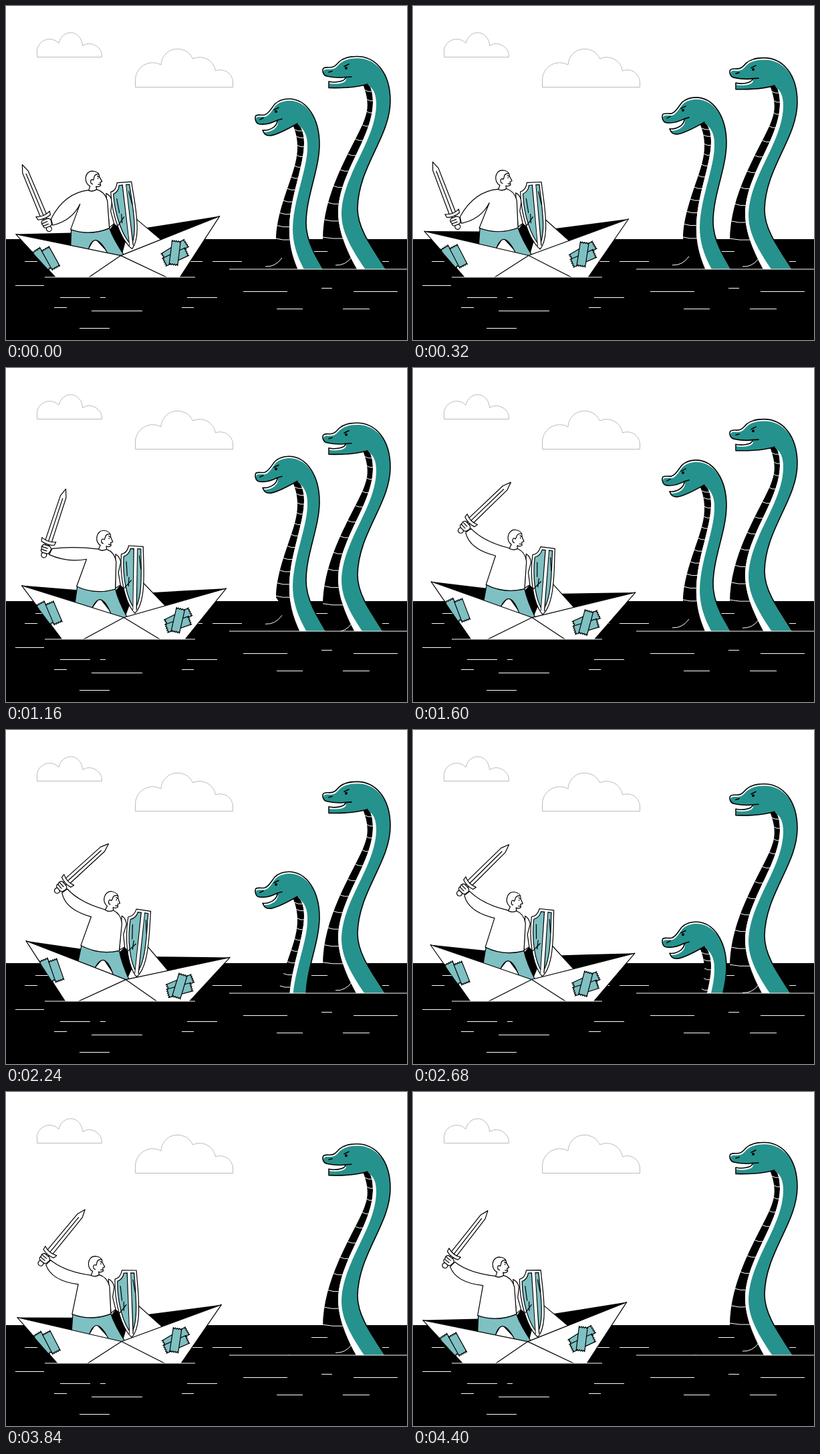
An HTML page that plays this animation: 600x500 px, repeating every 4440 ms.

```html
<!DOCTYPE html>
<html lang="en">
<head>
<meta charset="utf-8">
<title>Paper boat and sea serpents</title>
<style>
html, body { margin: 0; width: 100%; height: 100%; overflow: hidden; background: #fff; }
svg { display: block; width: 600px; height: 500px; }
.ink { fill: none; stroke: #000; stroke-width: 1.2; stroke-linejoin: round; stroke-linecap: round; }
.paper { fill: #fff; }
.aqua { fill: #7fc0c3; }
.foam { fill: none; stroke: #fff; }
.teal { fill: #26928d; }
.bold { stroke-width: 1.6; }
</style>
</head>
<body>
<svg viewBox="0 0 600 500">
  <defs>
    <clipPath id="aboveSerpentLine"><path d="M0 0H600V394H0Z"/></clipPath>
    <clipPath id="aboveBoatLine"><path d="M0 0H600V406H0Z"/></clipPath>
    <clipPath id="hullClip"><path d="M14 342L171 374L319 315L245 429H94Z"/></clipPath>
  </defs>

  <g fill="none" stroke="#b9bdbd">
    <path d="M46.5 76.5V72A19 19 0 0 1 79 55.5A18 20.500 0 0 1 114.5 59.5A19 19 0 0 1 143.5 76.5Z"/>
    <path d="M193.5 121.5V112A26 26 0 0 1 232 88A24.800 24.800 0 0 1 279.5 79A24 24 0 0 1 313.5 97A19 19 0 0 1 339.5 113V121.5Z"/>
  </g>

  <path d="M0 349H600V500H0Z"/>
  <path class="foam" d="M44 367.5h19M28 382.5h19M276 382.5h18M309 382.5h44M14 418.5h43M81 436.5h45M141 436.5h8M271 436.5h45
    M72 451.5h19M263 451.5h18M128 456.5h76M110 482.5h45
    M457 367.5h24M563 382.5h10M472 422.5h16M355 427.5h66M520 427.5h66M405 453.5h39M504 453.5h40"/>

  <g clip-path="url(#aboveSerpentLine)">
    <g id="far"></g>
    <g id="near"></g>
  </g>
  <path class="foam" d="M334 394H600"/>

  <g clip-path="url(#aboveBoatLine)">
    <g id="boat">
      <path d="M14 342L98 340L152 339L161 326L176 338L212 332L319 315L171 374Z"/>
      <path class="ink paper" d="M172 374L188 314L232 351Z"/>

      <path class="paper" d="M122 366L132 349L154 372Z"/>
      <path class="ink aqua" d="M97 334Q125 345 154 333Q160 350 177 375L152 372Q141 350 132 351Q126 353 122 366L96 361Z"/>
      <path class="ink paper" d="M149 281Q155 283 158 292L156 308L161 326L154 332Z"/>
      <g id="sword">
        <path class="ink paper" d="M-5 -12L-4.5 -83L0 -95L4.5 -83L5 -12Z"/>
        <path class="ink" d="M0 -12V-80"/>
        <path class="ink paper" d="M-2.5 -9H2.5V7H-2.5Z"/>
        <circle class="ink paper" cy="9" r="4"/>
        <path class="ink paper" d="M-11 -15Q0 -10 11 -15L10 -9.5Q0 -6 -10 -9.5Z"/>
      </g>
      <path id="torso" class="ink paper"/>
      <g id="hand">
        <path class="ink paper" d="M-5 -6H4Q9 -4 7 1Q7 6 2 6H-4Q-8 4 -6 1Q-9 -2 -5 -6Z"/>
        <path class="ink" d="M-6 -2H2M-6 2H2"/>
      </g>

      <path class="ink paper" d="M123 276.5L125 270C115.500 266 116.500 248 128 247.5C135 247.5 139 251 139 256L143 263L140 264.5L141 269Q138 272 134 270.5L135 275Q129 279 123 276.5Z"/>
      <path class="ink" d="M138 252Q131 252 131 258L130 261Q126 259 126 263T129 267M136 255l3 1.500M137 258v1M137 267.500h3"/>

      <g id="shield">
        <path class="ink paper" d="M165.500 265L187 263.500C190 285 196 310 195.500 335Q195 355 188 364C170 350 158 312 156 279Q164 277 165.500 265Z"/>
        <path class="ink aqua" d="M168.500 269L184 267.500C187 290 192 312 191.500 335Q191 350 187 358C173 345 162 312 160 282Q168 278 168.500 269Z"/>
        <path d="M176 267.500L187 359" fill="none" stroke="#000" stroke-width="6.500"/>
        <path d="M176 266L187 361" fill="none" stroke="#fff" stroke-width="4.300"/>
        <path class="ink" d="M165 289L169 310M167 329L176 316M172 312L173 325M183 278L188 297"/>
      </g>

      <path class="ink paper" d="M14 342L171 374L319 315L245 429H94Z"/>
      <path class="ink" d="M105 419L171 374L266 419"/>
      <g id="tape" clip-path="url(#hullClip)"></g>
    </g>
  </g>
  <path class="foam" d="M58 406H283"/>
</svg>
<script>
const LOOP = 4440, STEP = 40;
const el = id => document.getElementById(id);
const mix = (a, b, k) => a + (b - a) * k;

// Point where a downward curve reaches height y
function curveAt(d, y) {
  const path = document.createElementNS('http://www.w3.org/2000/svg', 'path');
  path.setAttribute('d', d);
  let low = 0, high = path.getTotalLength();
  for (let i = 0; i < 14; i++) {
    const mid = (low + high) / 2;
    if (path.getPointAtLength(mid).y < y) low = mid; else high = mid;
  }
  return path.getPointAtLength(low);
}

// outline: throat, head and back; skin: edge of the teal; belly and edge: both sides of the belly
function drawSerpent(id, { outline, skin, belly, edge, ribs, marks, eye }) {
  const [top, bottom, count] = ribs;
  let lines = '';
  for (let i = 0; i <= count; i++) {
    const y = mix(top, bottom, (i / count) ** 1.2);
    const a = curveAt(belly, y), b = curveAt(edge, y + 2);
    lines += `M${a.x} ${a.y}Q${(a.x + b.x) / 2} ${y + 3} ${b.x} ${b.y}`;
  }
  const join = side => outline + 'L' + side.slice(1);
  const reversed = 'M' + edge.slice(1).match(/[\d.]+ [\d.]+/g).reverse().join(' ')
    .replace(/^([\d.]+ [\d.]+) /, '$1C');
  const flip = side => 'M' + side.slice(1).split(/[C ]/).reduce(
    (pairs, n, i, all) => i % 2 ? [`${all[i - 1]} ${n}`, ...pairs] : pairs, []).join(' ').replace(/^(\S+ \S+) /, '$1C');
  el(id).innerHTML = `
    <clipPath id="${id}Clip"><path d="${join(reversed)}Z"/></clipPath>
    <path d="${belly}L${reversed.slice(1)}Z"/>
    <path class="foam" d="${lines}"/>
    <path class="paper" d="${join(reversed)}Z"/>
    <g clip-path="url(#${id}Clip)"><path class="teal" transform="translate(1 2.8)" d="${join(flip(skin))}Z"/></g>
    <path class="ink bold" d="${outline}${marks}"/>
    <path class="foam" d="M${eye[0] - 16} ${bottom + 42}q15 1 25 -13"/>
    <circle cx="${eye[0]}" cy="${eye[1]}" r="2"/>`;
}

drawSerpent('far', {
  outline: 'M541 117C525 122 505 123 483 122.5V113C490 115 508 114 508 106.5C500 108 490 107 480 105C475 104 473 98 474.5 94C476 91 481 92 484 92C492 92 494 88 499 83C506 77 516 75.5 525 75.5C553 75.5 575 100 575 142C575 196 527 240 526 303C526 336 550 364 585 420',
  skin: 'M541 117C549 120 553 130 553 145C552 200 502 250 501 308C501 345 528 378 556 420',
  edge: 'M541 117C546 119 549 130 549 145C548 198 498 250 497 308C497 345 518 385 541 420',
  belly: 'M534 117C541 135 543 150 538 165C528 200 474 270 474 350',
  ribs: [126, 346, 10],
  marks: 'M508 106.5L517 106M483 99L488 97.5M506 90.5L513 87',
  eye: [509, 93]
});

drawSerpent('near', {
  outline: 'M436 176C425 182 405 194 394 194C388 194 386 191 384 186C394 187 406 181 406 171C396 176 385 178 378 176.5C373 175 372 167 374 164C378 162 383 164 387 163C394 161 398 151 403 146C409 141 416 139 423 139C450 139 469 168 469 207C469 245 449 285 449 325C449 352 462 374 490 420',
  skin: 'M436 176C444 180 450 190 450 205C451 240 429 285 428 330C428 360 439 385 462 420',
  edge: 'M436 176C442 180 446 190 446 205C446 240 425 285 424 330C423 360 430 385 449 420',
  belly: 'M429 178C437 195 438 215 433 235C427 262 404 310 404 350',
  ribs: [185, 348, 10],
  marks: 'M406 171L413 169M380 170L385 167.5M401 155.5L408 152',
  eye: [404, 158]
});

// Torn tape: centre, length, angle
function strip(x, y, length, angle) {
  const top = 'l1.6 2 1.6 -2'.repeat(4), bottom = 'l-1.6 -2 -1.6 2'.repeat(4);
  return `<path class="ink aqua" transform="translate(${x} ${y}) rotate(${angle})"
    d="M-6.4 ${-length / 2}${top}v${length}${bottom}Z"/>`;
}
el('tape').innerHTML = strip(54, 380, 36, -33) + strip(66, 378, 34, -29) +
  strip(252, 366, 41, 58) + strip(253, 376, 38, 65) + strip(252, 370, 37, 7);

const ramp = (t, from, to) => Math.min(1, Math.max(0, (t - from) / (to - from)));
const smooth = (t, from, to) => (1 - Math.cos(Math.PI * ramp(t, from, to))) / 2;
const swell = (t, from, peak, to) => smooth(t, from, peak) - smooth(t, peak, to);

function polar(x, y, radius, degrees) {
  const a = degrees * Math.PI / 180;
  return [x + radius * Math.cos(a), y + radius * Math.sin(a)];
}

// k goes from lowered (0) to raised (1) sword; the hand circles the shoulder
function poseMan(k) {
  const hand = polar(107.5, 284, 63, mix(138.7, 209.6, k));
  const turn = mix(-13, 45, k);
  const upperWrist = polar(...hand, 9.4, turn - 32), lowerWrist = polar(...hand, 9.4, turn + 32);
  el('torso').setAttribute('d', `M123 276Q${mix(87, 84, k)} ${mix(280, 272, k)} ${upperWrist}
    L${lowerWrist}Q${mix(98, 64, k)} ${mix(322, 286, k)} ${mix(110, 104, k)} ${mix(297, 290, k)}
    L96 335Q125 345 154 333L151 292Q147 278 135 275Q129 279 123 276Z`);
  const grip = `translate(${hand}) rotate(${mix(-22.6, 38, k)})`;
  el('sword').setAttribute('transform', grip);
  el('hand').setAttribute('transform', grip);
  el('shield').setAttribute('transform', `translate(0 ${3 * k}) rotate(${3 * k} 180 330)`);
}

function draw(now) {
  const t = Math.floor(now % LOOP / STEP) * STEP;
  const tilt = 10.1 * (ramp(t, 0, 2000) - ramp(t, 2160, 4130));
  const bob = 8 * swell(t, 0, 930, 1820);
  const farY = bob + 6.3 * swell(t, 1820, 2980, LOOP);
  const nearY = 254 * ramp(t, 1810, 3300) - bob;
  el('boat').setAttribute('transform', `translate(.7 -.4) rotate(${tilt} 174.5 419)`);
  el('far').setAttribute('transform', `translate(0 ${farY})`);
  el('near').setAttribute('transform', `translate(0 ${nearY})`);
  poseMan(smooth(t, 720, 1520));
}

function tick() {
  draw(performance.now());
  requestAnimationFrame(tick);
}
tick();
</script>
</body>
</html>
```
